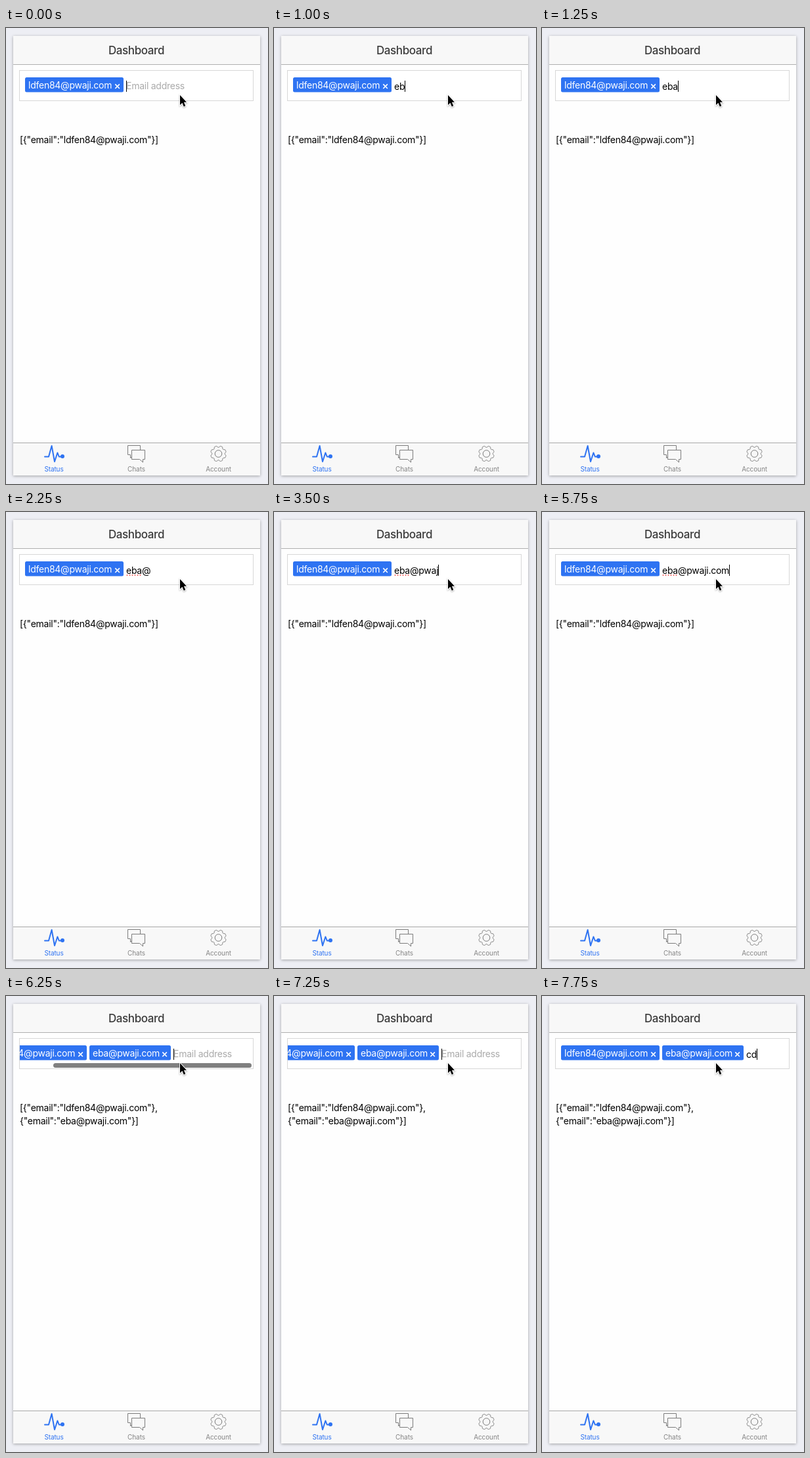
An HTML page for the animation above (8000 ms loop, 399 by 693 pixels).

```html
<!DOCTYPE html>
<html lang="en">
<head>
<meta charset="utf-8">
<title>Email chips</title>
<style>
  html, body { margin: 0; width: 100%; height: 100%; overflow: hidden; background: #edeef4; }
  svg { display: block; width: 399px; height: 693px; }
  text { font: 14px Inter, "Open Sans", sans-serif; letter-spacing: -.25px; white-space: pre; }
  .title { font-size: 17px; font-weight: 500; letter-spacing: -.4px; fill: #3c3c3c; text-anchor: middle; }
  .tab { font-size: 10px; letter-spacing: -.1px; fill: #858585; text-anchor: middle; }
  .icon { fill: none; stroke: #7c7c7c; }
  .phone { filter: drop-shadow(0 1px 2px rgba(0, 0, 0, .32)); }
  .chip rect { fill: #2e73f2; }
  .chip text { fill: #fff; }
  .chip path { stroke: #fff; stroke-width: 1.6; }
  .cursor { stroke: #fff; stroke-width: 2; paint-order: stroke; filter: drop-shadow(0 1px 1px rgba(0, 0, 0, .3)); }
</style>
</head>
<body>
<svg viewBox="0 0 399 693">
  <defs><clipPath id="inner"><rect x="21" y="65" width="355" height="45"/></clipPath></defs>

  <rect class="phone" x="11" y="12" width="376" height="668" rx="1" fill="#fefefe"/>
  <rect x="11" y="12" width="376" height="43" fill="#f8f8f8"/>
  <rect x="11" y="55" width="376" height="1" fill="#b0b0b0"/>
  <text class="title" x="198.5" y="40">Dashboard</text>

  <rect x="20.5" y="64.5" width="356" height="46" fill="#fff" stroke="#d7d7d7"/>
  <g clip-path="url(#inner)">
    <g id="row">
      <g class="chip">
        <rect x="29" y="75" width="150" height="22.5" rx="2.5"/>
        <text id="first" x="34" y="92"></text>
        <path d="M166.3 85.4l6.6 6.6m0-6.6l-6.6 6.6"/>
      </g>
      <g class="chip" id="chip2">
        <rect x="183" y="75" width="124" height="22.5" rx="2.5"/>
        <text id="second" x="188" y="92"></text>
        <path d="M294.3 85.4l6.6 6.6m0-6.6l-6.6 6.6"/>
      </g>
      <path id="dots" d="M184.5 95.9H206" stroke="#f4605c" stroke-width="2" stroke-linecap="round" stroke-dasharray="0 4"/>
      <text id="hint" y="93" fill="#aaa">Email address</text>
      <text id="typed" y="94"></text>
      <rect id="caret" y="80" width="1" height="17"/>
    </g>
    <rect id="bar" x="72" y="102" width="302" height="7" rx="3.5" fill="#808080"/>
  </g>

  <text id="json1" x="21" y="175"></text>
  <text id="json2" x="21" y="195"></text>

  <rect x="11" y="630" width="376" height="50" fill="#f8f8f8"/>
  <rect x="11" y="630" width="376" height="1" fill="#a9a9a9"/>
  <path d="M59 651.5H65L69.6 635L74 659L78.4 645.5L80.8 651.5H86" fill="none" stroke="#2e73f2" stroke-width="2" stroke-linejoin="round" stroke-linecap="round"/>
  <circle cx="86" cy="651" r="3" fill="#2e73f2"/>
  <path class="icon" d="M191.5 651.5L189.5 653.5V648.5H185.5V634.5H204.5V641M191.5 641.5H211.5V655.5H208.5V660L203.5 655.5H191.5Z"/>
  <path class="icon" id="gear"/>
  <circle class="icon" cx="323.5" cy="647" r="5.3"/>
  <text class="tab" x="73" y="674" style="fill:#2e73f2">Status</text>
  <text class="tab" x="198.5" y="674">Chats</text>
  <text class="tab" x="323.5" y="674">Account</text>

  <path class="cursor" d="M265 102V117L268.4 113.8L270.8 119.4L273.3 118.3L270.9 112.8H275Z"/>
</svg>
<script>
const LOOP = 8000;
const FIRST = "ldfen84@pwaji.com", SECOND = "eba@pwaji.com";
const el = Object.fromEntries([...document.querySelectorAll("[id]")].map(e => [e.id, e]));

// [start ms, letters typed, caret visible]
const typing = [
  [0, 0, 1], [500, 1, 1], [1000, 2, 1], [1250, 3, 1], [1750, 4, 1], [2250, 4, 0],
  [2750, 5, 1], [3250, 7, 1], [3500, 8, 1], [3750, 9, 1], [4000, 10, 1], [4250, 11, 1],
  [4750, 11, 0], [5250, 12, 1], [5750, 13, 1], [6250, 0, 1], [6750, 0, 0], [7250, 0, 1], [7750, 2, 1]
];

const show = (e, on) => e.setAttribute("visibility", on ? "visible" : "hidden");
const entry = mail => `{"email":"${mail}"}`;

// A circle with eight round notches, one every 45 degrees
function gearPath() {
  let d = "";
  for (let deg = 0; deg < 360; deg += 3) {
    const a = deg * Math.PI / 180;
    const u = ((deg + 22.5) % 45 - 22.5) / 13.5;
    const r = 11.9 - 2.2 * Math.max(0, 1 - u * u);
    d += (deg ? "L" : "M") + (323.5 + r * Math.cos(a)).toFixed(2) + " " + (647 + r * Math.sin(a)).toFixed(2);
  }
  return d + "Z";
}

function draw(t) {
  const [, count, caretOn] = typing.findLast(s => s[0] <= t);
  const added = t >= 6250;
  const x = added ? 311 : 183;
  const color = t >= 4500 && t < 5250 ? "#f00" : "#000";

  el.row.setAttribute("transform", `translate(${added && t < 7750 ? -56 : 0} 0)`);
  show(el.chip2, added);
  show(el.dots, t >= 1750 && !added);
  show(el.hint, !count);
  show(el.caret, caretOn);
  el.hint.setAttribute("x", x);
  el.typed.setAttribute("x", x);
  el.typed.setAttribute("fill", color);
  el.typed.textContent = (added ? "cd" : SECOND).slice(0, count);
  const width = count ? el.typed.getComputedTextLength() : 0;
  el.caret.setAttribute("x", x + Math.round(width));
  el.caret.setAttribute("fill", color);
  el.bar.setAttribute("opacity", !added || t >= 7000 ? 0 : t < 6750 ? 1 : 0.35);
  el.json1.textContent = "[" + entry(FIRST) + (added ? "," : "]");
  el.json2.textContent = added ? entry(SECOND) + "]" : "";
}

el.first.textContent = FIRST;
el.second.textContent = SECOND;
el.gear.setAttribute("d", gearPath());

const start = performance.now();
function tick() {
  draw((performance.now() - start) % LOOP);
  requestAnimationFrame(tick);
}
tick();
</script>
</body>
</html>
```
